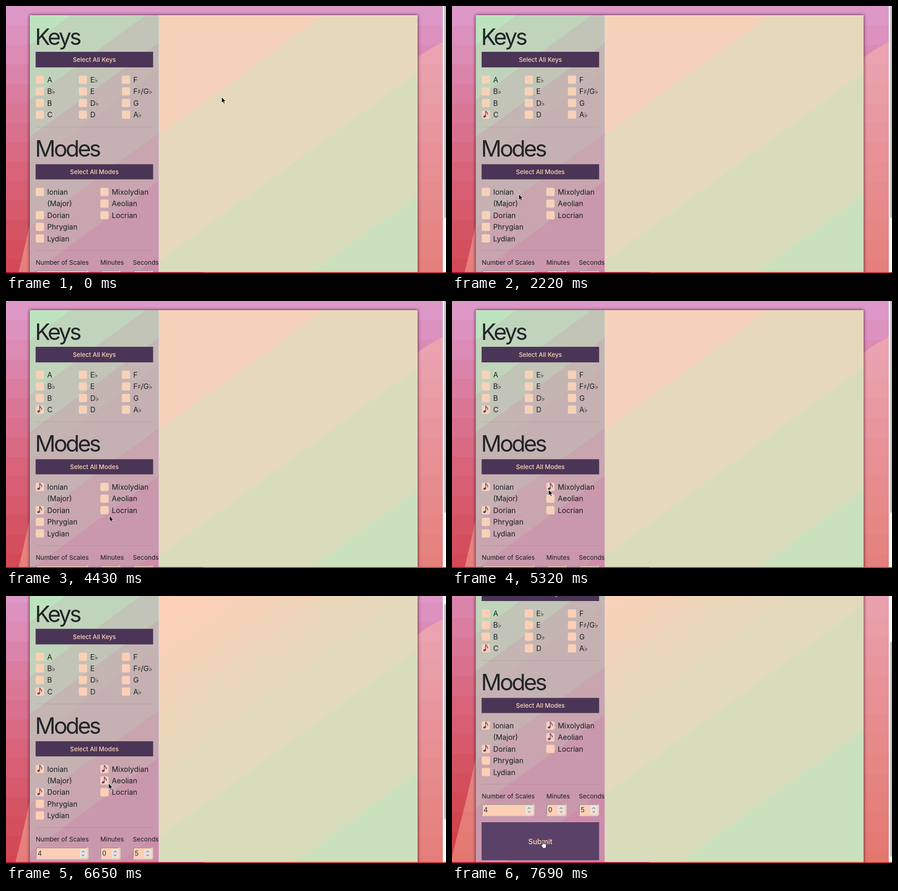
Recreate the animation shown at these times as an HTML page. Size 961x583 px, loop 8000 ms.

```html
<!DOCTYPE html>
<html lang="en">
<head>
<meta charset="utf-8">
<title>Scale practice</title>
<style>
  html, body { margin: 0; width: 100%; height: 100%; overflow: hidden; }
  svg { display: block; width: 100vw; height: 100vh; cursor: default; }
  text { font: 15.85px Inter, "DejaVu Sans", sans-serif; font-optical-sizing: none; fill: #191c20; }
  .title { font-size: 49.5px; letter-spacing: -3.8px; fill: #212529; }
  .accidental { font: bold 14.5px "DejaVu Sans", sans-serif; }
  .small { font-size: 13.7px; }
  .value { font-size: 14.5px; fill: #33264a; }
  .button { font-size: 13.3px; font-weight: 500; fill: #ffd5b8; text-anchor: middle; }
  .submit { font-size: 15.8px; }
  .peach { fill: var(--peach); }
  .dark { fill: #4a3556; }
  .hover { fill: #5a4167; }
  .shadow { filter: drop-shadow(0 0 3.5px rgba(40, 0, 20, .85)); }
</style>
</head>
<body>
<svg id="stage" viewBox="0 0 961 583" preserveAspectRatio="none"></svg>
<script>
const LOOP = 8000, STEP = 147.9, LAST = 52;
const PAGE_HEIGHT = 720, SUBMIT_TOP = 617, SCROLL_END = 123;

// Places the pointer glides between: [step, x, y].
const STOPS = [
  [0, 471, 199], [5, 60, 165], [8, 71, 235], [10, 73, 232], [13, 195, 340], [15, 146, 411],
  [17, 73, 402], [24, 72, 484], [28, 229, 480], [36, 211, 412], [39, 212, 433],
  [44, 225, 409], [47, 222, 410], [49, 166, 500], [52, 198, 535]
];
const CHECKED_AT = { C: 10, Ionian: 18, Dorian: 22, Mixolydian: 35, Aeolian: 39 };
const FINE_COLORS_AT = 45;

const rect = (x, y, w, h, attrs = "") => `<rect x="${x}" y="${y}" width="${w}" height="${h}" ${attrs}/>`;
const text = (x, y, label, cls = "") => `<text x="${x}" y="${y}" class="${cls}">${label}</text>`;
const mix = (from, to, k) => `style="fill:color-mix(in srgb, ${to} ${k * 100}%, ${from})"`;

// Horizontal stripes that step through three colours.
function stripes(top, middle, bottom) {
  const height = 42.5, count = Math.ceil(PAGE_HEIGHT / height);
  return Array.from({ length: count }, (_, i) => {
    const p = (i + .5) / count * 2;
    const color = p < 1 ? mix(top, middle, p) : mix(middle, bottom, p - 1);
    return rect(0, i * height, 961, height + 1, color);
  }).join("");
}

// Diagonal bands: each starts where y + 0.73x passes its offset.
const bands = (from, to, offsets) => offsets.map((offset, i) =>
  `<path d="M0 ${offset}L2000 ${offset - 1460}V2000H0Z" ${mix(from, to, i / (offsets.length - 1))}/>`).join("");

const accidentals = label => label.replace(/[♭♯]/g, '<tspan class="accidental">$&</tspan>');

function checkbox(x, y, label) {
  const note = label in CHECKED_AT
    ? `<g data-check="${CHECKED_AT[label]}" transform="translate(${x} ${y - 9})" fill="#5b3c78">
        <ellipse cx="6.3" cy="12.9" rx="3" ry="2.2" transform="rotate(-15 6.3 12.9)"/>
        <path d="M8.6 12.7V.6C9.2 4 14.6 4.6 12.8 9.4" fill="none" stroke="#5b3c78" stroke-width="1.5"/></g>` : "";
  return rect(x, y - 9, 18, 18, 'rx="3" class="peach"') + note + text(x + 25, y + 6, accidentals(label));
}

const grid = (columns, top) => columns.map(([x, labels]) =>
  labels.map((label, i) => label && checkbox(x, top + i * 25.4, label)).join("")).join("");

const wideButton = (y, h, label) => rect(64.7, y, 256.6, h, 'class="dark"') + text(193, y + h / 2 + 5.2, label, "button");
const rule = y => rect(65, y, 256, 1, 'fill="#000" opacity=".1"');

function numberField(x, w, label, value) {
  const s = x + w - 19;
  return text(x, 564.5, label, "small")
    + rect(x + .5, 577.5, w - 1, 25.5, 'rx="3.5" class="peach" stroke="#d6cfcc" stroke-width="1.6"')
    + `<path d="M${x + .8} 601V581q0-3 3-3H${x + w - 3}" fill="none" stroke="#8f8583" stroke-width="1.6"/>`
    + text(x + 4, 595.3, value, "value")
    + rect(s, 581, 15, 18.5, 'rx="3" fill="#e8e4e3"')
    + `<path d="M${s + 4.5} 588l3-3.2 3 3.2m-6 4.6l3 3.2 3-3.2" fill="none" stroke="#85807f" stroke-width="1.3"/>`;
}

const fineOffsets = Array.from({ length: 6 }, (_, i) => 350 + i * 62);
const stage = document.getElementById("stage");
stage.innerHTML = `
<defs>
  <clipPath id="wave"><path d="M899 113Q925 92 955 79L961 77V720H0V692L28 580Q38 540 51 480Z"/></clipPath>
  <clipPath id="side">${rect(52, 20, 282, 700)}</clipPath>
  <clipPath id="main">${rect(334, 20, 565, 700)}</clipPath>
</defs>
<g id="page">
  ${stripes("#dd9bcd", "#d8637a", "#cf393d")}
  <g clip-path="url(#wave)">${stripes("#ecacbe", "#e78f93", "#e3766c")}</g>
  ${rect(52, 20, 847, 760, 'class="shadow" fill="#c5b3b3"')}
  <g clip-path="url(#main)">
    ${bands("#f5d2b9", "#e6d9bb", [0, 526])}
    <g id="fine">${bands("#fdd0b8", "#e2dabb", [0, ...fineOffsets])}</g>
    ${bands("#d9dcbb", "#cbe0bd", [800, 1069])}
  </g>
  <g clip-path="url(#side)">
    ${bands("#bde3be", "#c4b5b3", [0, 123, 243, 324])}
    ${bands("#c5b1b2", "#cd8ca9", [383, 521, 625, 790])}
    ${text(63.5, 85, "Keys", "title")}
    ${wideButton(100, 34, "Select All Keys")}
    ${grid([[65, ["A", "B♭", "B", "C"]], [159, ["E♭", "E", "D♭", "D"]], [253, ["F", "F♯/G♭", "G", "A♭"]]], 161)}
    ${rule(263.5)}
    ${text(63.5, 329, "Modes", "title")}
    ${wideButton(345.5, 33, "Select All Modes")}
    ${grid([[65, ["Ionian", "", "Dorian", "Phrygian", "Lydian"]], [206, ["Mixolydian", "Aeolian", "Locrian"]]], 406)}
    ${text(90, 437.4, "(Major)")}
    ${rule(533.5)}
    ${numberField(65, 115, "Number of Scales", 4)}
    ${numberField(206, 44, "Minutes", 0)}
    ${numberField(277, 44, "Seconds", 5)}
    ${rect(64.7, SUBMIT_TOP, 256.6, 83, 'id="submit" class="dark"')}
    ${text(193, 665, "Submit", "button submit")}
  </g>
  ${rect(333.5, 20, 1, 700, 'fill="#dcdde4"')}
</g>
${rect(954, 0, 7, 583, 'fill="#fafafa"')}
${rect(957, -7, 8, 470, 'id="thumb" rx="4" fill="#c1c1c1"')}
${rect(0, 581, 961, 2, 'fill="#c53a35"')}
${rect(0, 581, 431, 2, 'fill="#b00f40"')}
<g id="pointer">
  <path id="arrow" d="M0 0V12.6L2.9 9.9 5 14.6 7.2 13.6 5.1 9.1H9Z" fill="#000" stroke="#fff" stroke-width=".9"/>
  <path id="hand" transform="translate(-4 0)" fill="#fff" stroke="#111" stroke-width="1"
    d="M3.2 8.8V1.8a1.3 1.3 0 0 1 2.6 0V6c.8-.7 2-.4 2.2.3.8-.5 1.8-.2 2 .5 1-.3 1.9.1 1.9 1.2v3c0 2-1.2 2.8-1.4 5H4.6C4.2 13.5 2 12 .6 9.8c-.8-1.2.8-2 1.6-1.2z"/>
</g>`;

const [page, fine, submit, thumb, pointer, arrow, hand] =
  ["page", "fine", "submit", "thumb", "pointer", "arrow", "hand"].map(id => document.getElementById(id));
const notes = [...stage.querySelectorAll("[data-check]")];
const show = (node, on) => node.setAttribute("visibility", on ? "visible" : "hidden");

function ease(from, to, value) {
  const k = Math.min(1, Math.max(0, (value - from) / (to - from)));
  return k * k * (3 - 2 * k);
}

function pointerAt(step) {
  const next = Math.max(1, STOPS.findIndex(stop => stop[0] >= step));
  const [t0, x0, y0] = STOPS[next - 1], [t1, x1, y1] = STOPS[next];
  const k = ease(t0, t1, step);
  return [x0 + (x1 - x0) * k, y0 + (y1 - y0) * k];
}

function draw(time) {
  const step = Math.min(LAST, Math.floor((time % LOOP + 15) / STEP));
  const [x, y] = pointerAt(step);
  const scroll = SCROLL_END * ease(43.63, 48.03, step);
  const hovering = y > SUBMIT_TOP - scroll, fineColors = step >= FINE_COLORS_AT;
  page.setAttribute("transform", `translate(0 ${-scroll})`);
  thumb.setAttribute("y", -7 + scroll * .868);
  pointer.setAttribute("transform", `translate(${Math.round(x)} ${Math.round(y)})`);
  notes.forEach(note => show(note, step >= +note.dataset.check));
  show(fine, fineColors);
  show(arrow, !hovering);
  show(hand, hovering);
  submit.setAttribute("class", hovering ? "hover" : "dark");
  stage.style.setProperty("--peach", fineColors ? "#fdcfb7" : "#f6d2b9");
}

const start = performance.now();
function tick() {
  draw(performance.now() - start);
  requestAnimationFrame(tick);
}
tick();
</script>
</body>
</html>
```
